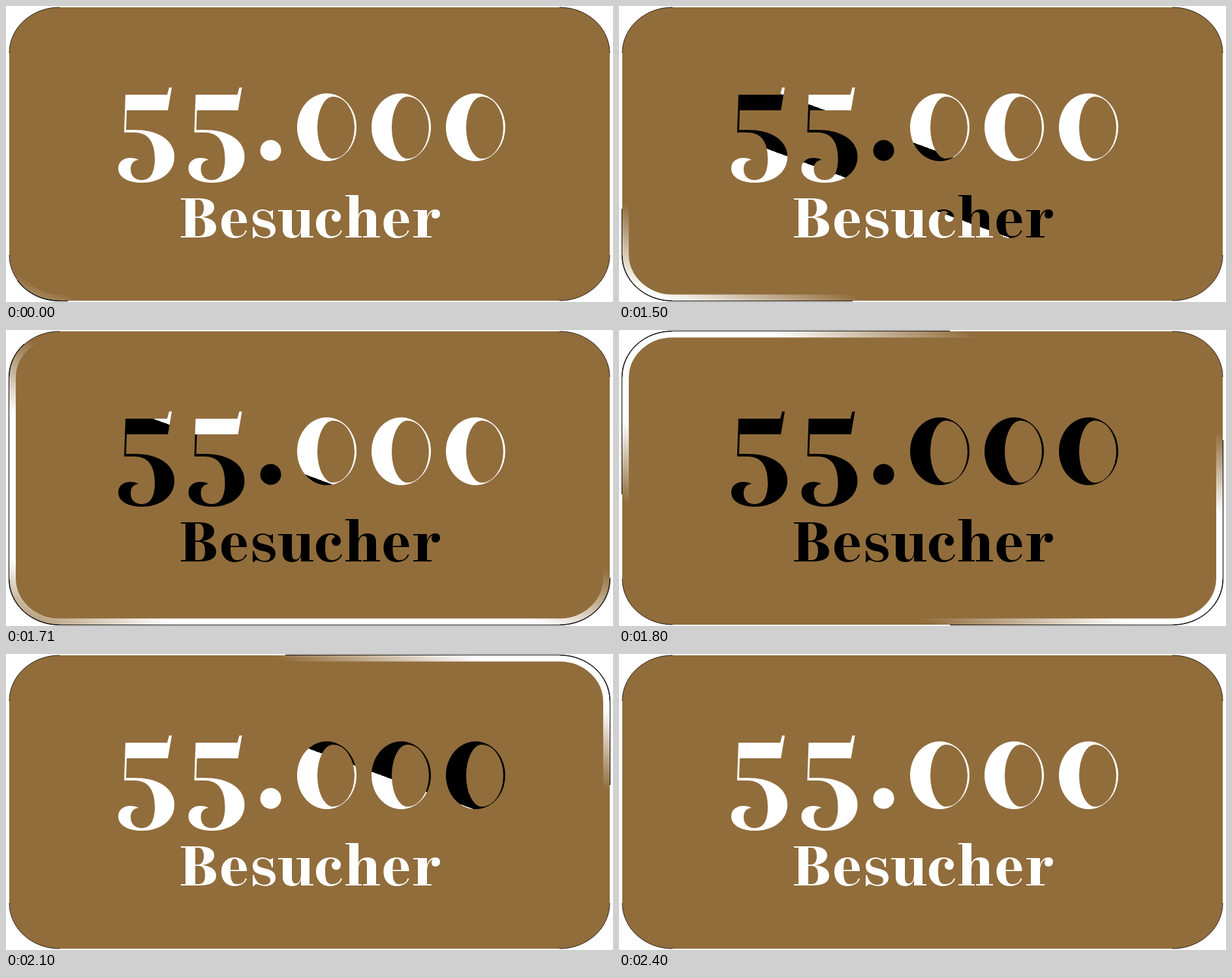
Animation, 930 px wide and 454 px high, one loop 3.6 s. Source, as an HTML page:

```html
<!DOCTYPE html>
<html lang="de">
<head>
<meta charset="utf-8">
<title>55.000 Besucher</title>
<style>
  html, body { margin: 0; width: 100%; height: 100%; overflow: hidden; background: #fff; }
  svg { display: block; width: 930px; height: 454px; }
</style>
</head>
<body>
<svg viewBox="0 0 930 454" role="img" aria-label="55.000 Besucher">
  <defs>
    <!-- glyphs of a high-contrast display face -->
    <path id="five" d="M183 136H247L250 125H254L248 160H185L184 190H197C235 190 258 207 258 231C258 256 236 271 208 271C186 271 172 262 172 249C172 239 180 233 190 233C196 233 200 234 203 236C195 237 191 242 191 250C191 261 198 267 208 267C222 267 228 254 228 235C228 210 219 194 197 194H181Z"/>
    <path id="zero" fill-rule="evenodd" d="M446 186A45.5 52 0 0 1 537 186A45.5 52 0 0 1 446 186ZM501 139A24 47.5 0 0 0 501 234A33 47.5 0 0 0 501 139Z"/>
    <path id="e" fill-rule="evenodd" d="M369 345C366 352 359 356 350 356C338 356 330 347 330 334C330 321 338 312 350 312C362 312 369 320 369 333H344V335C344 347 347 353 354 353C361 353 365 350 367 344ZM344 331H357C357 319 355 314 350 314C346 314 344 319 344 331Z"/>

    <mask id="lettering" maskUnits="userSpaceOnUse" x="0" y="0" width="930" height="454">
      <g fill="#fff">
        <use href="#five"/>
        <use href="#five" x="107.5"/>
        <circle cx="405.5" cy="221.5" r="16"/>
        <use href="#zero"/>
        <use href="#zero" x="114"/>
        <use href="#zero" x="228"/>
        <!-- B -->
        <path fill-rule="evenodd" d="M268 295H295C311 295 319 300 319 309C319 317 312 322 301 324C314 325 322 331 322 340C322 350 313 355 296 355H268V353H275V297H268ZM290 297V323H294C300 323 303 318 303 310C303 301 300 297 294 297ZM290 325V353H295C302 353 305 348 305 339C305 330 302 325 295 325Z"/>
        <use href="#e"/>
        <!-- s -->
        <path d="M409 313V327H407C406 319 400 314 394 314C388 314 385 317 385 321C385 326 390 327 397 329C407 331 413 335 413 343C413 351 406 356 397 356C391 356 387 353 384 353C382 353 381 354 380 356H378V339H380C382 348 388 354 396 354C402 354 405 351 405 347C405 342 400 340 393 339C383 337 378 333 378 325C378 317 385 312 393 312C398 312 402 315 405 315C407 315 407 314 408 313Z"/>
        <!-- u -->
        <path d="M417 313H438V342C438 349 440 352 444 352C450 352 452 345 452 337V315H445V313H465V353H471V355H452V346C450 352 446 356 439 356C429 356 424 351 424 342V315H417Z"/>
        <!-- c -->
        <path d="M515 345C512 352 506 356 496 356C484 356 475 347 475 334C475 321 484 312 497 312C507 312 513 317 513 323C513 328 510 331 506 331C502 331 499 328 499 324C499 321 501 319 504 318C503 315 501 314 498 314C491 314 489 320 489 334C489 347 492 353 499 353C506 353 511 350 513 344Z"/>
        <!-- h -->
        <path d="M520 290H540V321C542 315 547 312 554 312C563 312 567 317 567 325V353H573V355H547V353H553V324C553 318 552 316 548 316C543 316 540 322 540 330V353H545V355H520V353H526V292H520Z"/>
        <use href="#e" x="248.5"/>
        <!-- r -->
        <path d="M624 313H645V324C647 316 652 312 658 312C663 312 665 315 665 319C665 323 662 326 658 326C654 326 652 323 652 320C652 318 653 316 654 315C648 317 645 324 645 333V353H652V355H624V353H631V315H624Z"/>
      </g>
    </mask>

    <linearGradient id="glow" gradientUnits="userSpaceOnUse" x1="0" y1="0" x2="-162" y2="405">
      <stop offset="0" stop-color="#fff" stop-opacity="0"/>
      <stop offset=".26" stop-color="#fff"/>
      <stop offset=".74" stop-color="#fff"/>
      <stop offset="1" stop-color="#fff" stop-opacity="0"/>
    </linearGradient>
    <linearGradient id="rim" gradientUnits="userSpaceOnUse" x1="0" y1="0" x2="-162" y2="405">
      <stop offset=".02" stop-opacity="0"/>
      <stop offset=".02"/>
      <stop offset=".98"/>
      <stop offset=".98" stop-opacity="0"/>
    </linearGradient>
    <!-- a thin dark streak followed by a wide one -->
    <linearGradient id="streaks" gradientUnits="userSpaceOnUse" x1="0" y1="-261" x2="-260.7" y2="449.3">
      <stop offset="0" stop-color="#fff"/>
      <stop offset="0"/>
      <stop offset=".114"/>
      <stop offset=".114" stop-color="#fff"/>
      <stop offset=".39" stop-color="#fff"/>
      <stop offset=".39"/>
      <stop offset="1"/>
      <stop offset="1" stop-color="#fff"/>
    </linearGradient>
  </defs>

  <rect x="5" y="2" width="920" height="450" rx="77" ry="70" fill="#916d3c"/>
  <rect x="10" y="6.5" width="910" height="441" rx="72" ry="67" fill="none" stroke="url(#glow)" stroke-width="10"/>
  <rect x="4.5" y="1.5" width="921" height="451" rx="77" ry="70" fill="none" stroke="url(#rim)"/>
  <path d="M5 72A77 70 0 0 1 82 2M848 2A77 70 0 0 1 925 72M925 382A77 70 0 0 1 848 452M82 452A77 70 0 0 1 5 382" fill="none" stroke="#000" stroke-width=".8"/>
  <rect width="930" height="454" fill="url(#streaks)" mask="url(#lettering)"/>
</svg>
<script>
  const LOOP = 3600, FIRST = 34, LAST = 64;
  // [step, height at the left side] of the sweeping light
  const borderKeys = [[34, 405], [35, 395], [40, 300], [45, 0], [52, -480], [56, -630], [64, -825]];
  const textKeys = [[34, 560], [35, 540], [40, 305], [45, 0], [52, -480], [56, -570], [64, -760]];
  const byId = id => document.getElementById(id);

  // Smooth curve through the keys
  function track(keys, k) {
    const last = keys.length - 1;
    let i = 0;
    while (i < last - 1 && k > keys[i + 1][0]) i++;
    const slope = j => {
      const a = keys[Math.max(j - 1, 0)], b = keys[Math.min(j + 1, last)];
      return (b[1] - a[1]) / (b[0] - a[0]);
    };
    const [x0, y0] = keys[i], [x1, y1] = keys[i + 1];
    const d = x1 - x0, u = (k - x0) / d, s = u * u * (3 - 2 * u);
    return y0 + (y1 - y0) * s
      + d * u * (1 - u) * (slope(i) * (1 - u) - slope(i + 1) * u);
  }

  // Five 30 ms slots show four steps: the second slot holds
  function stepAt(t) {
    const slot = Math.floor(t / 30);
    const step = Math.floor(slot / 5) * 4 + Math.max(0, slot % 5 - 1);
    return Math.min(LAST, Math.max(FIRST, step));
  }

  function shift(id, y) {
    byId(id).setAttribute('gradientTransform', `translate(0 ${y.toFixed(2)})`);
  }

  const start = performance.now();
  function draw() {
    const k = stepAt((performance.now() - start) % LOOP);
    const light = track(borderKeys, k);
    shift('glow', light);
    shift('rim', light);
    shift('streaks', track(textKeys, k));
    requestAnimationFrame(draw);
  }
  draw();
</script>
</body>
</html>
```
